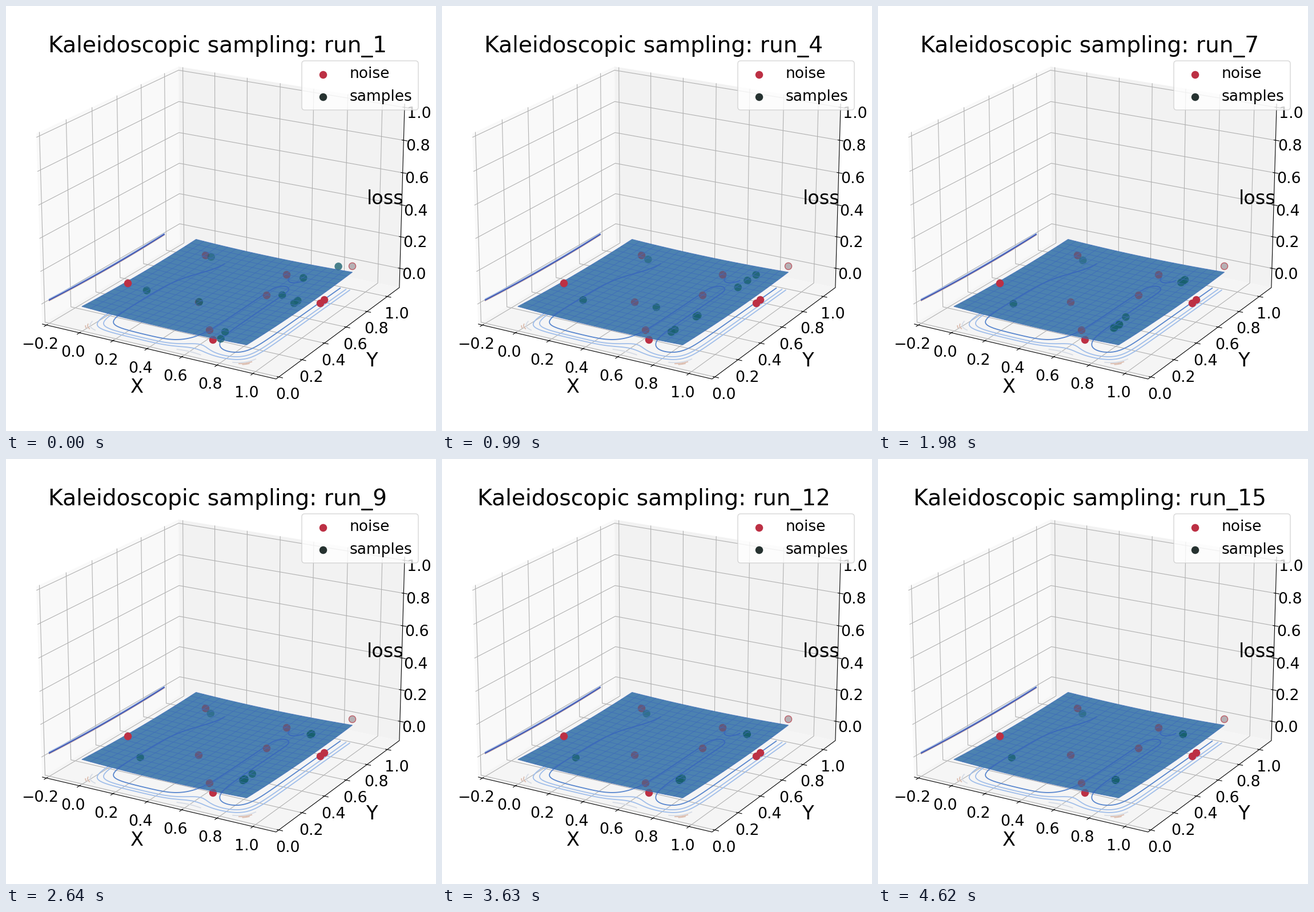
Animation of 753 by 744 pixels, one loop 4.95 s. Source, as a matplotlib script:

```python
import numpy as np
import matplotlib.pyplot as plt
from matplotlib.animation import FuncAnimation
from matplotlib.collections import LineCollection
from matplotlib.patches import FancyBboxPatch, Polygon

W, H, DPI = 753, 744, 64
PT = 72 / DPI  # points per pixel
RUNS, STEP_MS = 15, 330

plt.rcParams["font.family"] = "DejaVu Sans"
fig = plt.figure(figsize=(W / DPI, H / DPI), dpi=DPI, facecolor="white")
ax = fig.add_axes([0, 0, 1, 1])
ax.set(xlim=(0, W), ylim=(H, 0))
ax.axis("off")


def rgb(r, g, b):
    return r / 255, g / 255, b / 255


GRID = "#b0b0b0"
FILL = rgb(76, 130, 176)
MESH = rgb(62, 108, 186)
NOISE = rgb(188, 48, 68)
NOISE_UNDER = rgb(100, 88, 122)
SAMPLE = rgb(24, 96, 110)
CONTOUR_UNDER = rgb(58, 105, 187)
BLUE, LIGHT, TAN = rgb(88, 134, 206), rgb(160, 190, 234), rgb(220, 190, 176)

# Camera: the axis box is a little larger than the limits
LIMITS = np.array([(-0.2, 1.1), (0, 1.1), (-0.1, 1.0)])
MARGIN = np.diff(LIMITS, axis=1)[:, 0] / 48
LO, HI = LIMITS[:, 0] - MARGIN, LIMITS[:, 1] + MARGIN
BOX = np.array([4, 4, 3]) * 25 / 84
ELEV, AZIM, DIST = np.radians(20), np.radians(-60), 10
SCALE, CENTER = 3905, (382.3, 362.8)
SE, CE, SA, CA = np.sin(ELEV), np.cos(ELEV), np.sin(AZIM), np.cos(AZIM)
VIEW = np.array([(-SA, CA, 0), (-SE * CA, -SE * SA, CE), (CE * CA, CE * SA, SE)])


def project(x, y, z):
    """Pixel positions of points in data space."""
    p = np.stack(np.broadcast_arrays(x, y, z), axis=-1)
    right, up, near = np.moveaxis(((p - LO) / (HI - LO) - 0.5) * BOX @ VIEW.T, -1, 0)
    depth = DIST - near
    return np.stack([CENTER[0] + SCALE * right / depth,
                     CENTER[1] - SCALE * up / depth], axis=-1)


def lines(segments, color, width=1.1, z=1.0, **kw):
    ax.add_collection(LineCollection(segments, colors=[color],
                                     linewidths=width * PT, zorder=z, **kw))


def area(points, color, z):
    return ax.add_patch(Polygon(points, closed=True, facecolor=color,
                                edgecolor="none", zorder=z))


def text(x, y, s, size, z=8, **kw):
    return ax.text(x, y, s, fontsize=size * PT, color="black", zorder=z, **kw)


def dots(points, colors, z, size=13.5, **kw):
    kw.setdefault("linewidths", 0)
    x, y = np.transpose(points)
    return ax.scatter(x, y, s=(size * PT) ** 2, facecolors=colors, zorder=z, **kw)


def draw_box():
    (x0, y0, z0), (x1, y1, z1) = LO, HI
    loop_a, loop_b = np.array([0, 1, 1, 0]), np.array([0, 0, 1, 1])
    xs, ys, zs = x0 + (x1 - x0) * loop_a, y0 + (y1 - y0) * loop_a, z0 + (z1 - z0) * loop_b
    area(project(x0, ys, zs), "#f9f9f9", 0)
    area(project(xs, y1, zs), "#f2f2f2", 0)
    area(project(xs, y0 + (y1 - y0) * loop_b, z0), "#f5f5f5", 0)
    lines([project([x0, x1, x1, x1], [y0, y0, y1, y1], [z0, z0, z0, z1])],
          "black", z=0.8)

    # Ticks reach a little inwards and further outwards
    reach = np.array([1, -2]) / 120
    x_tick = x1 - (x1 - x0) * reach
    y_tick = y0 + (y1 - y0) * reach

    def axis(start, grid, tick, shift):
        for v in np.arange(start, 1.01, 0.2):
            lines([project(*grid(v))], GRID, z=0.5)
            mark = project(*tick(v))
            lines([mark], "black", z=0.8)
            x, y = mark[0] + (mark[1] - mark[0]) / 3 + shift
            label = f"{v + 1e-9:.1f}".replace("-", "\u2212")
            text(x, y + 9.8, label, 26.8, ha="center")

    axis(-0.2, lambda v: (v, [y0, y1, y1], [z0, z0, z1]),
         lambda v: (v, y_tick, z0), (-11.5, 32))
    axis(0, lambda v: ([x1, x0, x0], v, [z0, z0, z1]),
         lambda v: (x_tick, v, z0), (16.3, 28.8))
    axis(0, lambda v: ([x0, x0, x1], [y0, y1, y1], v),
         lambda v: (x_tick, y1, v), (25, 8.5))
    text(230, 677, "X", 33.5, ha="center")
    text(640, 631, "Y", 33.5, ha="center")
    text(631.5, 347, "loss", 33.5)


EDGE = 0.95  # the sheet spans 0..EDGE in x and y


def loss(x, y):
    return 0.048 * ((x - 0.53) ** 2 + (y - 0.56) ** 2) - 0.001


def on_sheet(x, y):
    x, y = np.broadcast_arrays(x, y)
    return project(x, y, loss(x, y))


def draw_sheet():
    s = np.linspace(0, EDGE, 20)
    outline = np.concatenate([on_sheet(s, 0), on_sheet(EDGE, s),
                              on_sheet(s[::-1], EDGE), on_sheet(0, s[::-1])])
    lines([on_sheet(s, c) for c in s] + [on_sheet(c, s) for c in s],
          MESH, 1.0, z=4, alpha=0.75)
    return area(outline, FILL, 2)


def height(s, t):
    """Field behind the floor contours: three walls, a corner and a ridge."""
    walls = sum(np.exp(-d / 0.06) for d in (s, t, 1 - s))
    corner = 0.5 * np.exp(-(s ** 2 + (1 - t) ** 2) / 0.0586)
    gap = 1 - 0.2 * np.exp(-((t - 0.915) / 0.05) ** 2)
    ridge = 0.36 * gap * np.exp(-((s - 0.655) / 0.118) ** 2)
    return walls + corner + ridge


def draw_contours(sheet):
    s, t = np.meshgrid(np.linspace(0, 1, 90), np.linspace(0, 1, 90))
    px, py = np.moveaxis(project(EDGE * s, EDGE * t, LIMITS[2, 0]), -1, 0)
    field = height(s, t)
    ax.contour(px, py, field, levels=[0.311, 0.56, 0.82, 1.25, 1.45, 1.65],
               colors=[BLUE, LIGHT, LIGHT, rgb(214, 220, 230), TAN, TAN],
               linewidths=1.8 * PT, zorder=1)
    under = ax.contour(px, py, field, levels=[0.311], colors=[CONTOUR_UNDER],
                       linewidths=1.9 * PT, zorder=2.5)
    under.set_clip_path(sheet)

    # Profiles on the left wall
    y = np.linspace(0, EDGE, 20)
    for x, color, width in ((0.5, TAN, 1.6), (0.02, LIGHT, 1.5),
                            (0.2, rgb(66, 88, 180), 2.2)):
        lines([project(LIMITS[0, 0], y, loss(x, y))], color, width)


# Starts of the samples, listed by the valley they fall into
VALLEYS = {
    (0.213, 0.773): [(0.151, 0.817)],
    (0.220, 0.165): [(0.014, 0.345)],
    (0.812, 0.780): [(0.699, 0.549), (0.652, 0.802), (0.909, 1.016)],
    (0.814, 0.176): [(0.995, 0.571), (0.994, 0.609), (0.688, 0.076),
                     (0.771, -0.015), (0.446, 0.334)],
}
START = np.array([p for group in VALLEYS.values() for p in group])
GOAL = np.array([v for v, group in VALLEYS.items() for _ in group])
# A start close to the ridge takes longer to leave it
LAG = np.where(np.abs(START[:, 0] - 0.44) < 0.02, 6.5, 0)


def remaining(run, rate, middle):
    """Logistic fall from 1 at run 0 to 0."""
    return (1 + np.exp(-rate * middle)) / (1 + np.exp(rate * (run - middle)))


def sample_points(run):
    left = np.column_stack([remaining(run, 1.1, LAG - 2),
                            remaining(run, 0.6, LAG + 2.5)])
    return on_sheet(*(GOAL + (START - GOAL) * left).T)


def draw_noise(sheet):
    x, y = START.T
    points = on_sheet(x, y)
    beyond = y > 1
    open_air = ((x < 0.02) | (x > EDGE)) & ~beyond
    covered = ~open_air & ~beyond
    dots(points[covered], [NOISE], 1.5)
    dots(points[covered], [NOISE_UNDER], 2.8).set_clip_path(sheet)
    dots(points[open_air], [NOISE], 4.5)
    dots(points[beyond], [rgb(182, 176, 180)], 4.5, 12, linewidths=1.4 * PT,
         edgecolors=[rgb(190, 95, 105)])


def draw_legend():
    ax.add_patch(FancyBboxPatch((522, 100), 196, 78, zorder=9, alpha=0.8,
                                boxstyle="round,pad=4,rounding_size=5",
                                facecolor="white", edgecolor="#cccccc",
                                linewidth=1.4 * PT))
    for y, name, color in ((120, "noise", NOISE),
                           (159, "samples", rgb(38, 50, 48))):
        dots([(555, y)], [color], 10)
        text(602, y + 6.5, name, 26.4, z=10)


draw_box()
sheet = draw_sheet()
draw_contours(sheet)
draw_noise(sheet)
draw_legend()
title = text(371, 81, "", 39.1, ha="center")
# The far left sample looks fainter
samples = dots(sample_points(1),
               [(*SAMPLE, 0.5 if x < 0.5 < y else 0.78) for x, y in GOAL], 3)


def update(i):
    title.set_text(f"Kaleidoscopic sampling: run_{i + 1}")
    samples.set_offsets(sample_points(i + 1))
    return title, samples


anim = FuncAnimation(fig, update, frames=RUNS, interval=STEP_MS,
                     init_func=lambda: update(0), repeat=True)
plt.show()
```
